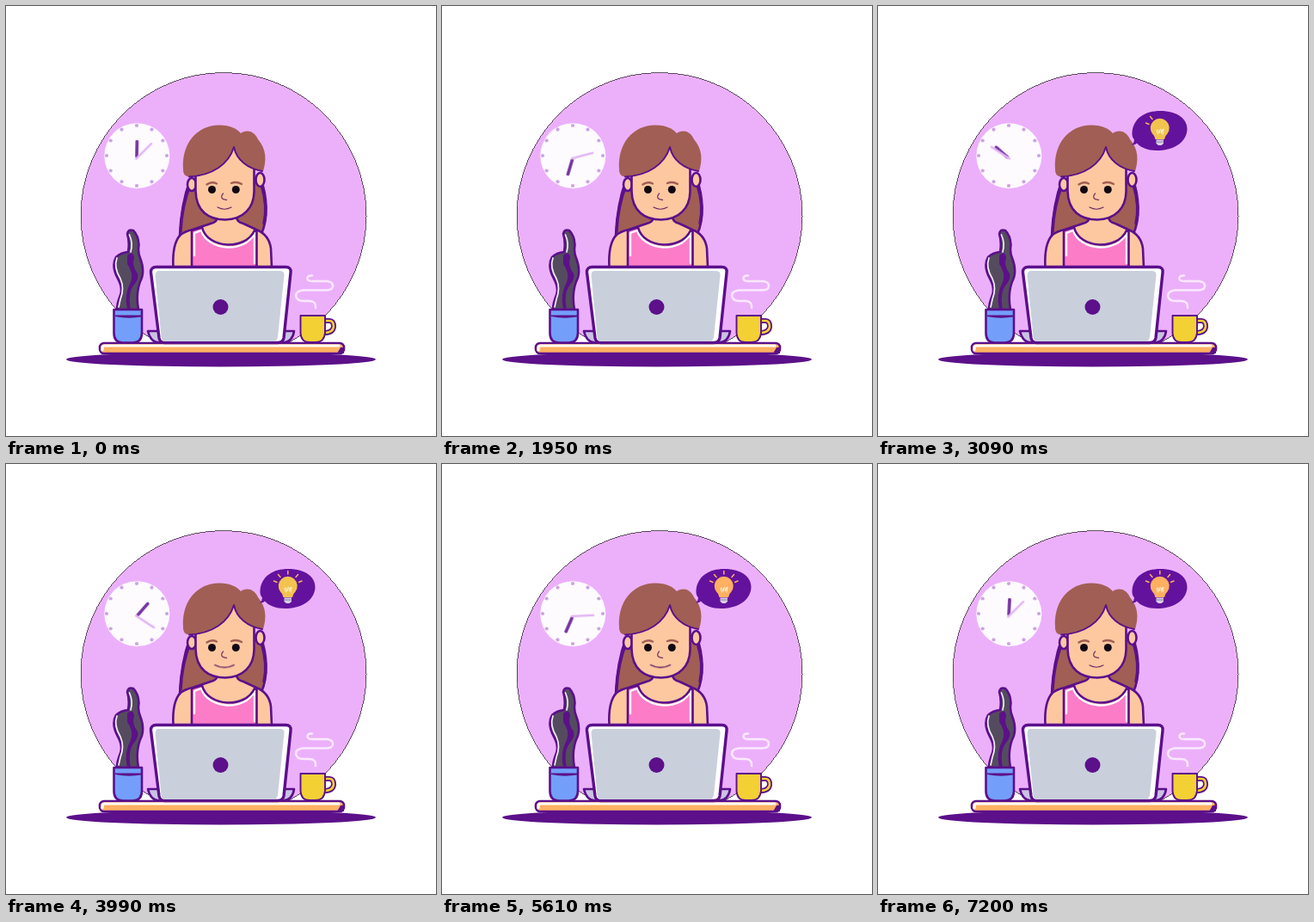
Write an HTML page that moves like this. It is 500 px wide and 500 px high and loops after 7.23 s.

```html
<!DOCTYPE html>
<html lang="en">
<head>
<meta charset="utf-8">
<title>Working at the desk</title>
<style>
  html, body { margin: 0; width: 100%; height: 100%; overflow: hidden; background: #fff; }
  svg { display: block; width: 100vw; height: 100vh; }
  svg * { animation-duration: 7230ms; animation-iteration-count: infinite; animation-timing-function: linear; }

  .ink { stroke: #5b0f8b; stroke-width: 2.6; stroke-linejoin: round; stroke-linecap: round; }
  .thin { stroke-width: 1.9; }
  .thick { stroke-width: 3.4; }
  .line { fill: none; stroke-linecap: round; stroke-linejoin: round; }
  .skin { fill: #fdc8a0; }
  .hair { fill: #a15e54; }
  .dark { fill: #5c1089; }
  .edge { stroke: #1a1020; stroke-width: .7; shape-rendering: crispEdges; }

  .hour, .minute { transform-origin: 152px 177px; }
  .hour { animation-name: hour; }
  .minute { animation-name: minute; }
  @keyframes hour { from { transform: rotate(1deg); } to { transform: rotate(726deg); } }
  @keyframes minute { from { transform: rotate(45deg); } to { transform: rotate(1491deg); } }

  .bubble { transform-origin: 296px 160px; animation-name: pop; }
  @keyframes pop {
    0%, 37.5% { transform: scale(0); }
    41%, 100% { transform: scale(1); }
  }
  .ray { animation-name: ray; }
  @keyframes ray {
    0%, 42.8% { opacity: 0; }
    45%, 100% { opacity: 1; }
  }
  .bulb { animation-name: glow; animation-timing-function: step-end; }
  @keyframes glow {
    0% { fill: #f3c34f; }
    62.6% { fill: #ffb060; }
    83% { fill: #f5d038; }
    93.5%, 100% { fill: #ffb060; }
  }
  .leaf { animation-name: leaf; animation-timing-function: step-end; }
  @keyframes leaf {
    0% { fill: #544c5e; }
    83% { fill: #0fdc7c; }
    93.5%, 100% { fill: #544c5e; }
  }
  .smile { transform-origin: 254px 235px; animation-name: smile; animation-timing-function: ease-in-out; }
  @keyframes smile {
    0%, 44% { transform: scale(1); }
    58%, 88% { transform: scale(1.42, 1.35); }
    98%, 100% { transform: scale(1); }
  }
</style>
</head>
<body>
<svg viewBox="0 0 500 500">
  <circle class="edge" cx="253" cy="243.5" r="166" fill="#ecb0fb"/>

  <!-- clock -->
  <circle cx="152.3" cy="174.2" r="38" fill="#fdfbfe"/>
  <g id="dots" fill="#cda3e3"></g>
  <path class="line hour" d="M152 175V157.500" stroke="#7330a2" stroke-width="3.600"/>
  <path class="line minute" d="M152 178V153" stroke="#e3b5f6" stroke-width="2.600"/>

  <!-- shadow and desk -->
  <ellipse class="dark" cx="250" cy="411" rx="180" ry="8.500"/>
  <rect class="ink" x="109" y="392" width="284" height="12" rx="5" fill="#ffb264"/>
  <path class="line" d="M112 400V397.500Q112 395 115 395H387" stroke="#fff" stroke-width="3.200"/>
  <path class="dark" d="M389 397H393V404H385Z"/>

  <!-- hair behind the shoulders -->
  <path class="hair ink" d="M214 202C206 224 203 242 202 267L250 258H268L297 265C305 247 304 222 296 200Z"/>
  <path class="line ink thick" d="M214 208C207 226 204 242 203 262M297 208C302 224 303 240 300 253"/>

  <!-- body -->
  <path class="skin ink" d="M194.500 304Q193 276 203 266Q208 262 217 260L238 253Q246 251 246 245H268Q268 251 276 253L291 260Q306 266 308 282L309 304Z"/>
  <path d="M216 261L228 257.500C234 284 278 288 289 261L291.500 262V304H216Z" fill="#fd7cc8"/>
  <path class="line" d="M219 290V264L227 261C235 285 278 288 289 264V299" stroke="#fff" stroke-width="2.400"/>
  <path class="line ink" d="M216 304V261L228 257.500C234 282 278 285 289 261L291.500 262V304"/>

  <!-- head -->
  <ellipse class="skin ink" cx="216" cy="207.500" rx="5" ry="7.500"/>
  <ellipse class="skin ink" cx="295.500" cy="202" rx="5" ry="8"/>
  <path class="skin ink" d="M220.500 190V215C221 239 236 248.500 255 248.500C276 248 288 235 288.500 216V182L264 158Z"/>
  <path class="hair" d="M206 190C204 160 222 138.500 248 138.500C261 138.500 269 143 273 148C281 143 289 146 293 155C303 167 303 179 299 192C283 189 268 179 265 164C259 184 240 197 213 198.500C208 198 206 195 206 190Z"/>
  <path class="line ink thin" d="M213 198.500C240 197 259 184 265 164C268 179 281 189 298 192"/>
  <path class="line" d="M233.500 207.500Q239 203.500 245 206.500M262 206Q268 203.500 274 207" stroke="#a15e54" stroke-width="2.400"/>
  <g fill="#100812">
    <circle cx="239.500" cy="213.500" r="4.500"/>
    <circle cx="267.300" cy="213.500" r="4.500"/>
  </g>
  <path class="line" d="M252.500 218Q247.500 224.500 256.500 225.500" stroke="#7a3b64" stroke-width="1.300"/>
  <path class="line smile" d="M246 234Q254 238.500 262 234" stroke="#6b2b66" stroke-width="1.200"/>

  <!-- plant -->
  <path class="leaf ink" d="M141 265Q142 259 148 261Q154 267 154.500 278Q153 286 156 293Q161 306 158 316Q150 332 154 353H129Q129 346 133 336Q136 328 130 317Q122 302 128 292Q133 287 142 286Q144 275 141 265Z"/>
  <path class="dark" d="M141 290Q148 284 149 293Q146 302 153 311Q155 317 149 324Q141 334 145 353H141Q137 335 145 321Q149 311 141 300Z"/>
  <path class="line" d="M143.500 266Q148 276 145 286M129 293Q125 304 133 317Q138 328 133 341L131 350" stroke="#f3eaf8" stroke-width="1.700"/>
  <path class="ink" d="M125.500 353H158V380Q158 391.500 147 391.500H136Q125.500 391.500 125.500 380Z" fill="#739ffa"/>
  <path class="dark" d="M127 359.500H157V361.500Q142 364 127 361Z"/>

  <!-- cup and steam -->
  <path class="line ink" d="M371 366H376Q381 366 381 373Q380 380 370 380" style="stroke-width:6"/>
  <path class="line" d="M371 366H376Q381 366 381 373Q380 380 370 380" stroke="#f3d034" stroke-width="2.600"/>
  <path class="ink thin" d="M342.500 360H371V380Q370 391 360 391H353Q343 391 342.500 380Z" fill="#f3d034"/>
  <path class="line" d="M356 313.500Q350 313 350.500 317.500Q352 320.500 358 320H373Q380 320.500 380 325.500Q380 330.500 372 330.500H345Q337 331.500 337 337Q338 343 346 343H353Q361 343.500 360 351" stroke="#fae9ff" stroke-width="2.500"/>

  <!-- laptop -->
  <path class="ink" d="M165 378H335Q333 391 322 391.500H178Q168 391 165 378Z" fill="#cbc2e4"/>
  <path class="ink thick" d="M175 303.500H325Q332 303.500 331 310L323 386Q322 391.500 316 391.500H184Q179 391.500 178 386L168.500 310Q168 303.500 175 303.500Z" fill="#fff"/>
  <path d="M178 308H318Q324 308 323.500 313L316 385Q315 390 310 390H186Q181 390 180.500 385L173.500 313Q173.500 308 178 308Z" fill="#c9d0dc"/>
  <circle class="dark" cx="249.500" cy="350" r="9"/>

  <!-- idea bubble -->
  <g class="bubble">
    <path d="M295.500 147C297 130 311 122 328 122C349 122 360 132 359.500 144C358 160 342 168 324 168C314 168 306 165 301 159.500Q299 162 295 161.500Q298 159 298 155.500Q295 152 295.500 147Z" fill="#63129d"/>
    <path class="bulb" d="M322.500 155Q322 151 319 148.500A11 11 0 1 1 336.500 148.500Q333.500 151 333 155Z"/>
    <path class="line" d="M325.500 149L324 144.500Q326 142.500 327 148Q327.500 142.500 329 143.500L329.500 148Q330.500 142.500 332 143L331 149" stroke="#fff3dc" stroke-width="1"/>
    <path d="M323.500 155.500H332V160L329.500 162H326L323.500 160Z" fill="#d8d0e2"/>
    <path d="M323.500 158H332" stroke="#8e78a8"/>
    <g class="line" stroke="#ffb060" stroke-width="1.500">
      <path d="M311.500 136L315 137.500M316.500 128.500L319 131.500"/>
      <path class="ray" d="M327.800 124.500V128M339.500 128.500L337 131.500M344 136L340.500 137.500"/>
    </g>
  </g>
</svg>
<script>
  const dots = document.getElementById('dots');
  for (let i = 0; i < 12; i++) {
    const a = i * Math.PI / 6;
    const dot = document.createElementNS('http://www.w3.org/2000/svg', 'circle');
    dot.setAttribute('cx', 152 + 35 * Math.sin(a));
    dot.setAttribute('cy', 174 - 35 * Math.cos(a));
    dot.setAttribute('r', 2.1);
    dots.append(dot);
  }
</script>
</body>
</html>
```
